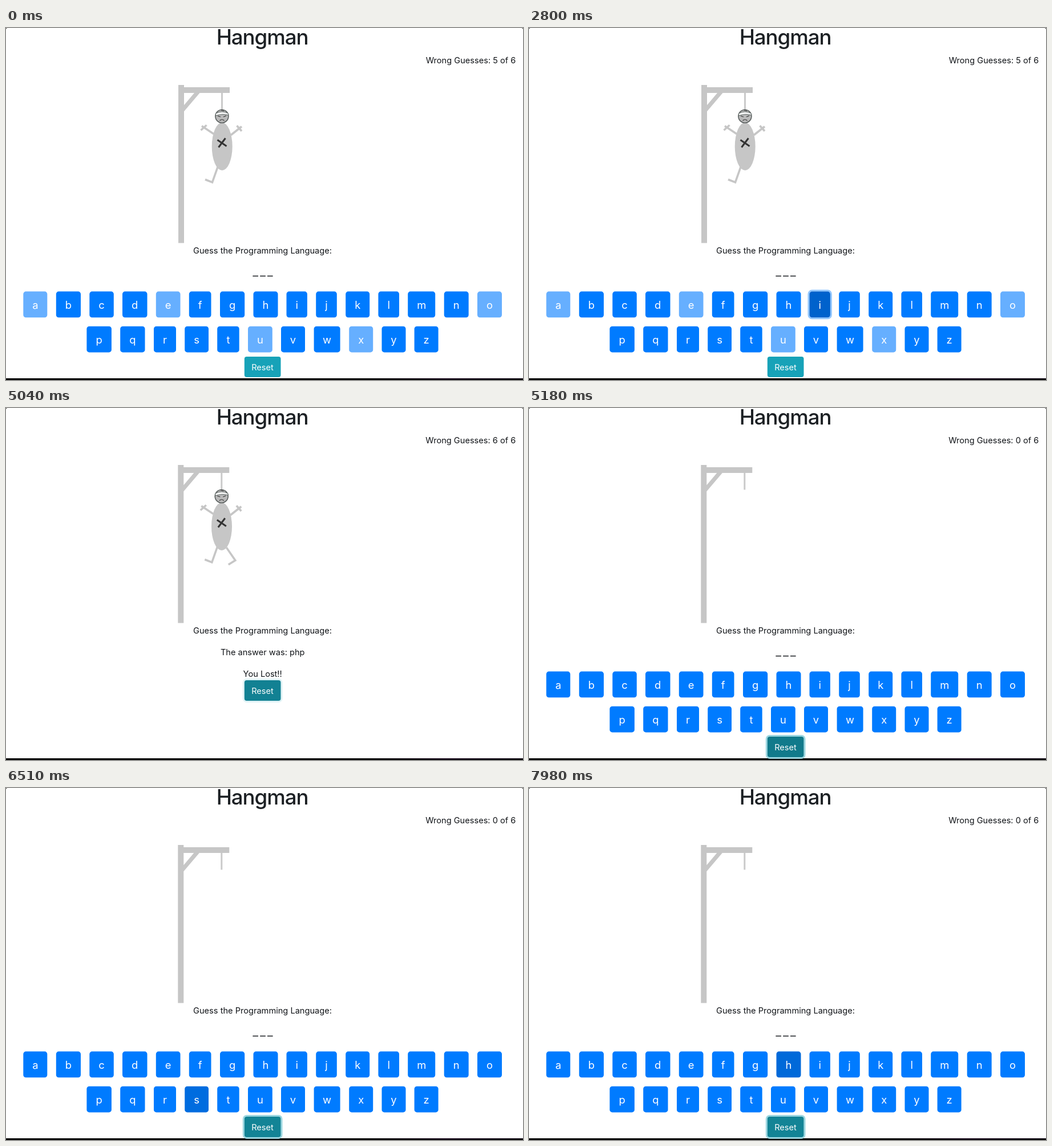
An HTML page for the animation above (8 s loop, 906 px wide and 618 px high).

```html
<!DOCTYPE html>
<html lang="en">
<head>
<meta charset="utf-8">
<title>Hangman</title>
<style>
html, body { margin: 0; width: 100%; height: 100%; overflow: hidden; background: #fff; }
svg { display: block; width: 906px; height: 618px; }
text { font: 14.6px Inter, sans-serif; fill: #111418; text-anchor: middle; font-optical-sizing: none; }
.title { font-size: 36.7px; font-weight: 500; letter-spacing: -.03em; fill: #1c2024; }
.right { text-anchor: end; }
.blanks { font: 15.4px "Liberation Sans", Arial, sans-serif; stroke: #111418; stroke-width: .6; }
.key text { font-size: 18.4px; }
.key text, #reset text { fill: #fff; }
.ring { fill: none; stroke-width: 3; opacity: 0; }
.wood { fill: #c6c6c6; }
.limb { fill: none; stroke: #c6c6c6; stroke-width: 3.6; }
.ink { fill: none; stroke: #333; }
</style>
</head>
<body>
<svg viewBox="0 0 906 618">
  <defs>
    <linearGradient id="edge">
      <stop offset=".7" stop-color="#000"/>
      <stop offset=".85" stop-color="#160619"/>
      <stop offset="1" stop-color="#0c0510"/>
    </linearGradient>
  </defs>
  <path d="M0 0h2L0 2zM906 0h-2l2 2z" fill="#555"/>
  <rect y="615" width="906" height="3" fill="url(#edge)"/>
  <text class="title" x="449" y="29.3">Hangman</text>
  <text class="right" id="count" x="893.3" y="62"></text>

  <g id="scene">
    <path class="wood" d="M302 100h10v4h80v10h-80v263.5h-10zM330 114h9.5L311.5 147v-11z"/>
    <path d="M378.5 114v29.5" stroke="#cacaca" stroke-width="3"/>
    <g id="man">
      <path class="limb" d="M364 186L343 172M341.5 179.5L351.5 170.5M394 188L413 173M404.5 171.5L413 181"/>
      <path class="limb" d="M371 244L361.5 271L349 266"/>
      <path class="limb" id="leg" d="M387 245L402.5 267.5L390.5 275"/>
      <ellipse class="wood" cx="378.7" cy="208" rx="18" ry="42"/>
      <path class="ink" stroke-width="3" d="M370.5 196.5L386.5 207.5M372.5 209.5L384.5 193.5"/>
      <circle cx="378.4" cy="155" r="11.5" fill="#b9b9b9" stroke="#5b605f" stroke-width="1.6"/>
      <path d="M367.5 150q11-6 22 0l.5 3q-11-3-22.5 1z" fill="#f4f4f4" stroke="#59625f" stroke-width="1"/>
      <path class="ink" stroke-width="1.2" d="M371 154.5l5 1.5M381 156l5-2M374.5 162.5q4-3.5 8 0M377 144.5l5 1"/>
    </g>
  </g>

  <text x="449.5" y="396">Guess the Programming Language:</text>
  <g id="board"><text class="blanks" x="450" y="433">_ _ _</text></g>
  <g id="lost">
    <text x="449.7" y="434">The answer was: php</text>
    <text x="449.7" y="472">You Lost!!</text>
  </g>
  <g id="reset">
    <rect class="ring" x="416.3" y="575.5" width="66.7" height="39" rx="5.5" stroke="#9cd7e1"/>
    <rect class="face" x="417.8" y="577" width="63.7" height="36" rx="4"/>
    <text x="449.5" y="600.8">Reset</text>
  </g>
</svg>
<script>
const LOOP = 8000, LOSE = 2870, RESTART = 5180;
const $ = id => document.getElementById(id);
const BLUE = [0, 123, 255], BLUE_HOVER = [0, 105, 217], BLUE_DOWN = [0, 98, 204];
const TEAL = [23, 162, 184], TEAL_HOVER = [19, 132, 150], TEAL_DOWN = [17, 122, 139];

// left edge and width of every key
const rows = [
  { y: 462.6, names: 'abcdefghijklmno',
    x: [30.3, 87.8, 146.3, 204, 262.8, 320.8, 375, 433.5, 491.5, 543.2, 595.2, 652.4, 704.2, 767.7, 826],
    w: [42, 43.2, 42.5, 43.5, 42.7, 38.7, 43.2, 43, 36.4, 36.6, 42, 36.6, 48, 43, 43] },
  { y: 523.8, names: 'pqrstuvwxyz',
    x: [141.4, 200.2, 259, 313.2, 370.2, 424, 482, 539.6, 601.2, 658.5, 715.6],
    w: [43.5, 43.3, 39, 41.8, 38.5, 42.8, 42, 46, 42, 42, 42] }
];

// pointer visits: key, enter, leave
const visits = [
  ['h', 5935, 6000], ['t', 6010, 6075], ['s', 6080, 6475],
  ['t', 6512, 6570], ['f', 6530, 6915], ['g', 6925, 7205],
  ['t', 7285, 7500], ['u', 7500, 7760], ['h', 7800, 8200]
];

const keys = {};
for (const { y, names, x, w } of rows) [...names].forEach((name, i) => {
  $('board').insertAdjacentHTML('beforeend', `<g class="key">
    <rect class="ring" x="${x[i] - 1.5}" y="${y - 1.5}" width="${w[i] + 3}" height="48.6" rx="6" stroke="#93c7ff"/>
    <rect class="face" x="${x[i]}" y="${y}" width="${w[i]}" height="45.6" rx="4.5"/>
    <text x="${x[i] + w[i] / 2}" y="${y + 30.2}">${name}</text></g>`);
  keys[name] = $('board').lastElementChild;
});

const ease = (t, start, span = 150) => {
  const p = Math.min(1, Math.max(0, (t - start) / span));
  return p * p * (3 - 2 * p);
};
const mix = (a, b, p) => a.map((v, i) => v + (b[i] - v) * p);
const paint = (button, color, ring, opacity = 1) => {
  const face = button.querySelector('.face');
  face.style.fill = `rgb(${color.map(Math.round)})`;
  face.style.opacity = opacity;
  button.querySelector('.ring').style.opacity = ring;
};
const show = (id, on) => { $(id).style.display = on ? '' : 'none'; };

function draw(t) {
  const lost = t >= LOSE && t < RESTART, fresh = t >= RESTART;
  $('count').textContent = `Wrong Guesses: ${fresh ? 0 : lost ? 6 : 5} of 6`;
  $('scene').setAttribute('transform', `translate(${t < LOSE ? 0 : -.7})`);
  show('man', !fresh);
  show('leg', lost);
  show('lost', lost);
  show('board', !lost);

  for (const name in keys) {
    const hover = visits.filter(v => v[0] === name)
      .reduce((sum, [, enter, leave]) => sum + ease(t, enter) * (1 - ease(t, leave)), 0);
    const press = name === 'i' && !fresh ? ease(t, 2690, 110) : 0;
    const used = !fresh && 'aeoux'.includes(name);
    paint(keys[name], press ? mix(BLUE, BLUE_DOWN, press) : mix(BLUE, BLUE_HOVER, Math.min(1, hover)),
      press, used ? .6 : 1);
  }

  const hover = mix(TEAL, TEAL_HOVER, ease(t, 3800));
  const down = ease(t, 5000, 110) * (1 - ease(t, RESTART));
  paint($('reset'), mix(hover, TEAL_DOWN, down), ease(t, 5000, 110));
  $('reset').setAttribute('transform', `translate(0 ${lost ? -99 : 0})`);
}

const begin = performance.now();
function tick() {
  draw((performance.now() - begin) % LOOP);
  requestAnimationFrame(tick);
}
tick();
</script>
</body>
</html>
```
